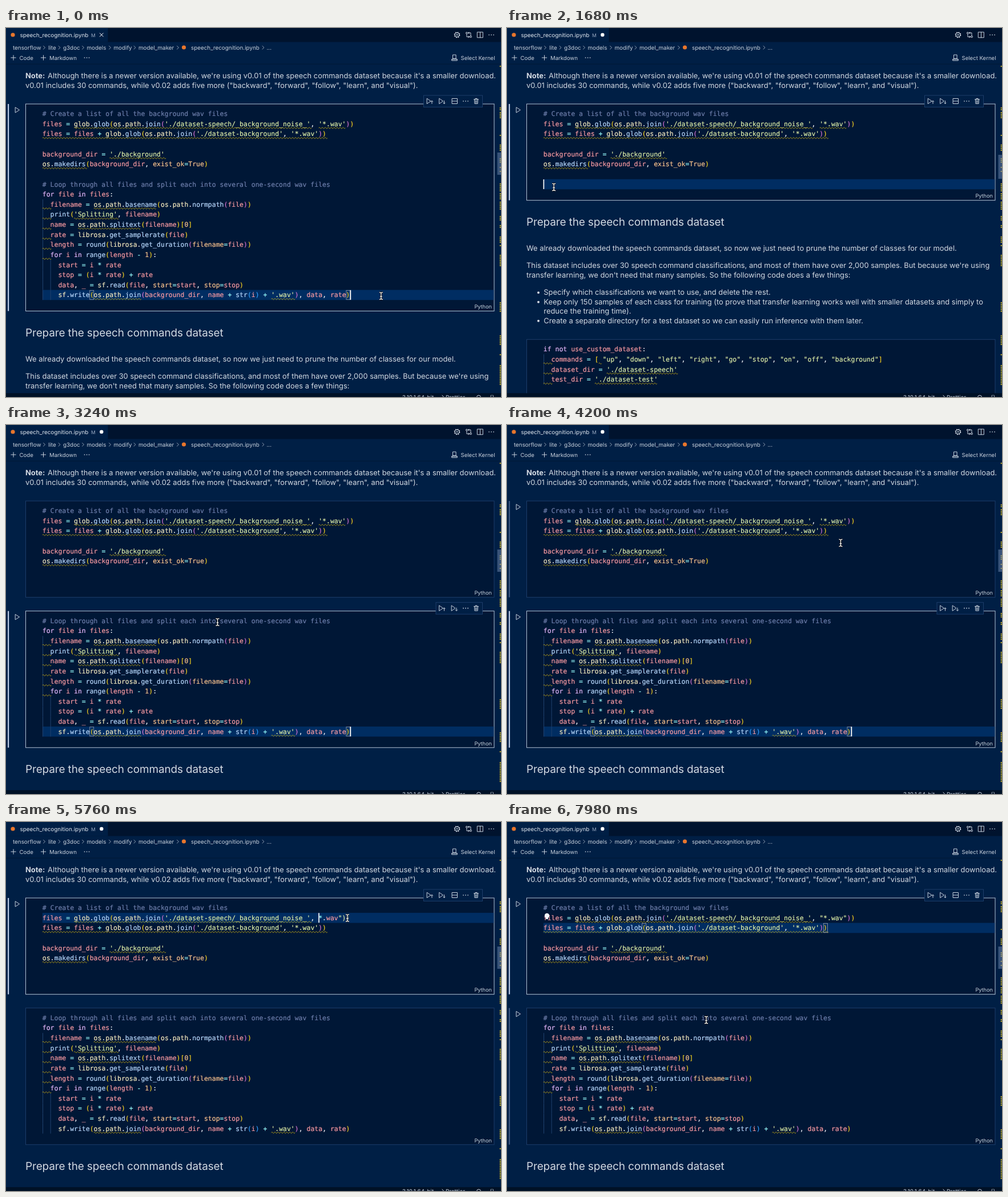
These frames come from a looping animation (867 by 646 pixels, 8 s). An HTML page:

```html
<!DOCTYPE html>
<html lang="en">
<head>
<meta charset="utf-8">
<title>Notebook editor</title>
<style>
html, body { margin: 0; width: 100%; height: 100%; overflow: hidden; background: #001f45; }
svg { display: block; width: 867px; height: 646px; }
text { white-space: pre; font-family: Inter, sans-serif; font-optical-sizing: none; text-rendering: geometricPrecision; }
.code { font-family: "DejaVu Sans Mono", monospace; font-size: 11.48px; stroke-width: .18; }
.body { font-size: 12.92px; fill: #d3d9e2; }
.ui { font-size: 9.85px; fill: #c8d0dc; }
.tool { font-size: 9.6px; }
.icon { fill: none; stroke: #c8d0dc; stroke-width: 1; stroke-linecap: round; stroke-linejoin: round; }
</style>
</head>
<body>
<svg viewBox="0 0 867 646">
  <rect width="867" height="646" fill="#001f45"/>
  <g id="doc"></g>
  <g id="chrome"></g>
  <rect id="caret" width="1.7" height="17" fill="#fff"/>
  <g id="mouse"></g>
</svg>
<script>
const LOOP = 8000, X0 = 63.8, CW = 6.911, LH = 17.62;
const PAGE = '#001f45', CELL = '#001736', EDGE = '#1d3d6a';
const el = id => document.getElementById(id);
const rect = (x, y, w, h, fill, more = '') =>
  `<rect x="${x}" y="${y}" width="${w}" height="${h}" fill="${fill}" ${more}/>`;
const text = (x, y, s, cls = 'ui', more = '') => `<text x="${x}" y="${y}" class="${cls}" ${more}>${s}</text>`;
const icon = (x, y, d, more = '') => `<path class="icon" transform="translate(${x} ${y})" d="${d}" ${more}/>`;

const PLUS = 'M-4.2 0H4.2M0-4.2V4.2', DOTS = 'M-4 0h.1M0 0h.1M4 0h.1', CHEVRON = 'M-1.5-2.8L1.5 0L-1.5 2.8';
const RUN = 'M-3-4.5L4 0L-3 4.5Z';
const RUN_UP = 'M-4.5-4.5L2 0L-4.5 4.5ZM4 4.5V-.5M2.3 1L4-.7L5.7 1';
const RUN_DOWN = 'M-4.5-4.5L2 0L-4.5 4.5ZM4-.5V4.5M2.3 3L4 4.7L5.7 3';
const SPLIT = 'M-4.5-4.5H4.5V4.5H-4.5ZM-4.5 0H4.5';
const TRASH = 'M-4-3H4M-1.5-3V-4.5H1.5V-3M-3-3L-2.6 4.5H2.6L3-3M-1-1V3M1-1V3';
const dots = (x, y) => icon(x, y, DOTS, 'style="stroke-width:1.7"');

// A tilde switches the warning underline on and off.
const HEAD = [
  '# Create a list of all the background wav files',
  '',
  "~files = files + glob.glob(os.path.join('./dataset-background', '*.wav'))~",
  '',
  "background_dir = ~'./background'~",
  '~os.makedirs~(background_dir, exist_ok=True)',
  ''
];
const TAIL = [
  '# Loop through all files and split each into several one-second wav files',
  'for file in files:',
  '~  ~filename = ~os.path.basename~(os.path.normpath(file))',
  "~  ~print(~'Splitting'~, filename)",
  '~  ~name = ~os.path.splitext~(filename)[0]',
  '~  ~rate = librosa.get_samplerate(file)',
  '~  ~length = round(librosa.get_duration(filename=file))',
  '~  ~for i in range(length - 1):',
  '    start = i * rate',
  '    stop = (i * rate) + rate',
  '    data, _ = sf.read(file, start=start, stop=stop)',
  "    sf.write(~os.path.join~(background_dir, name + str(i) + ~'.wav'~), data, rate)"
];
const NEXT = [
  'if not use_custom_dataset:',
  '~  ~commands = [~ ~"up", "down", "left", "right", "go", "stop", "on", "off", "background"]',
  "~  ~dataset_dir = ~'./dataset-speech'~",
  "~  ~test_dir = ~'./dataset-test'~",
  '', ''
];
const plain = s => s.replace(/~/g, '');

const TOKEN = /(#.*)|('[^']*'?|"[^"]*"?)|\b(for|in|if|not)\b|\b(True|\d+|[a-z_]+(?==))|([A-Za-z_]\w*)(?=\()|\b(glob|os|path|sf|librosa)\b|([A-Za-z_]\w*)|([=+*-])|([()[\]])|(.)/g;
const COLORS = ['#7080ae', '#e0efa8', '#ebbbff', '#ffc58f', '#bbdaff', '#f7ebc0', '#ff9da4', '#99ffff'];
const BRACKETS = ['#f5d020', '#d673d2', '#2f9fff'];

function paint(line) {
  let depth = 0;
  return line.replace(TOKEN, (tok, ...groups) => {
    const kind = groups.slice(0, 10).findIndex(g => g !== undefined);
    let color = COLORS[kind] || '#f0f3f8';
    if (kind === 8) color = BRACKETS['(['.includes(tok) ? depth++ % 3 : Math.max(0, --depth) % 3];
    return `<tspan fill="${color}" stroke="${color}">${tok}</tspan>`;
  });
}

function squiggles(line, y) {
  let col = 0, out = '';
  line.split('~').forEach((part, i) => {
    if (i % 2) {
      const x = X0 + col * CW, n = Math.max(1, Math.round(part.length * CW / 5.2));
      out += `<path d="M${x} ${y}${'q1.3-2.4 2.6 0t2.6 0'.repeat(n)}" fill="none" stroke="#c2a814" stroke-width=".9"/>`;
    }
    col += part.length;
  });
  return out;
}

const lineY = (top, i) => top + 17.2 + i * LH;
const cellHeight = n => n * LH + 27.7;

function bracketPair(line, col) {
  if (line[col - 1] !== ')') return [];
  for (let i = col - 1, depth = 0; i >= 0; i--) {
    depth += line[i] === ')' ? 1 : line[i] === '(' ? -1 : 0;
    if (!depth) return [i, col - 1];
  }
  return [];
}

function selection(top, lines, from) {
  let out = '';
  for (let i = from.line; i < lines.length; i++) {
    const s = plain(lines[i]), start = i === from.line ? from.col : 0;
    const w = (s.length - start) * CW + (i < lines.length - 1 ? 7 : 0);
    out += rect(X0 + start * CW, lineY(top, i) - 8.8, w, LH, '#003a82');
    const marks = s.replace(/./g, (c, k) => c === ' ' && k >= start ? '·' : ' ');
    out += text(X0, lineY(top, i) + 4, marks, 'code', 'fill="#4a74b4"');
  }
  return out;
}

function toolbar(top, split) {
  const x = split ? 731.5 : 753, y = top - 5;
  const xs = split ? [742, 763.5] : [763.5, 785];
  return rect(x, y - 10, 834.5 - x, 20.5, PAGE, `stroke="${EDGE}"`) +
    icon(xs[0], y, RUN_UP) + icon(xs[1], y, RUN_DOWN) +
    (split ? icon(786, y, SPLIT) : '') + dots(805, y) + icon(823.5, y, TRASH);
}

function cell(top, lines, { focus, hover, caret, select, split } = {}) {
  const h = cellHeight(lines.length);
  let out = rect(34.5, top, 820.5, h, CELL, `stroke="${focus ? '#b4c0d4' : EDGE}"`);
  if (focus || hover) {
    out += rect(3, top, 2.2, h, focus ? '#b9c8e4' : '#3d5881') + icon(19.5, top + 10.5, RUN);
  }
  if (select) out += selection(top, lines, select);
  else if (focus) out += rect(X0, lineY(top, caret.line) - 8.8, 790.5, LH, '#002d62');
  lines.forEach((line, i) => {
    const y = lineY(top, i), s = plain(line), indent = s.search(/\S/);
    if (indent >= 2) out += rect(64, y - 8.8, 1, LH, '#1f416e');
    if (indent >= 4) out += rect(77.6, y - 8.8, 1, LH, '#1f416e');
    out += text(X0, y + 4, paint(s), 'code') + squiggles(line, y + 7.2);
  });
  if (focus && !select) {
    for (const c of bracketPair(plain(lines[caret.line]), caret.col)) {
      out += rect(X0 + c * CW, lineY(top, caret.line) - 8, CW, 16, 'none', 'stroke="#8b95a5" stroke-width=".9"');
    }
  }
  out += text(851, top + h - 4.2, 'Python', 'ui', 'text-anchor="end" style="font-size:9.2px"');
  return out + (focus ? toolbar(top, split) : '');
}

function prose(y) {
  const row = (dy, s, x = 34) => text(x, y + dy, s, 'body');
  const bullet = dy => `<circle cx="55" cy="${y + dy - 4}" r="2" fill="#d3d9e2"/>`;
  return text(34, y + 44.6, 'Prepare the speech commands dataset', 'body', 'style="font-size:18.95px;letter-spacing:-.12px"') +
    row(88.6, 'We already downloaded the speech commands dataset, so now we just need to prune the number of classes for our model.') +
    row(118.8, "This dataset includes over 30 speech command classifications, and most of them have over 2,000 samples. But because we're using") +
    row(135.2, "transfer learning, we don't need that many samples. So the following code does a few things:") +
    bullet(165.7) + row(165.7, 'Specify which classifications we want to use, and delete the rest.', 64.3) +
    bullet(182.2) + row(182.2, 'Keep only 150 samples of each class for training (to prove that transfer learning works well with smaller datasets and simply to', 64.3) +
    row(198.6, 'reduce the training time).', 64.3) +
    bullet(215) + row(215, 'Create a separate directory for a test dataset so we can easily run inference with them later.', 64.3) +
    cell(y + 243.6, NEXT);
}

function insertButtons(y) {
  const box = (x, w, fill, s) => rect(x, y - 3.5, w, 17.5, fill, `stroke="${EDGE}"`) +
    icon(x + 8.5, y + 5.3, PLUS) + text(x + 18, y + 9, s, 'ui tool');
  return box(372, 45, '#1c3152', 'Code') + box(429, 66.5, PAGE, 'Markdown');
}

// Timeline
const PRESS = 250, CUT = 1520, INSERT = 2640, PASTE = 2920, FOCUS = 4500, NEXT_LINE = 7300;
const BLINKS = [0, 250, 600, 1000, CUT, INSERT, PASTE, FOCUS, 5150, 5600, 6100, NEXT_LINE];
const PATH = [
  [0, 657, 469], [230, 606, 468], [300, 604, 467], [900, 33.5, 273], [1500, 33.5, 273],
  [2300, 406, 315], [2700, 406, 315], [3180, 370.5, 345], [3750, 370.5, 345], [4420, 656, 160],
  [4930, 656, 160], [5130, 598, 168], [5950, 598, 168], [6080, 621, 165], [6800, 621, 165],
  [7220, 580, 186], [7450, 580, 186], [7950, 349, 346.5]
];

function mouseAt(t) {
  const i = PATH.findIndex(p => p[0] > t);
  if (i < 0) return PATH[PATH.length - 1].slice(1);
  const [t0, x0, y0] = PATH[i - 1], [t1, x1, y1] = PATH[i];
  const k = (t - t0) / (t1 - t0), e = k * k * (3 - 2 * k);
  return [x0 + (x1 - x0) * e, y0 + (y1 - y0) * e];
}

function globLine(t) {
  const open = t < 5720 ? "'" : t < 5850 ? '' : '"';
  const close = t < 5300 ? "'" : t < 5430 ? '' : '"';
  const mark = t < 5300 ? '~' : '';
  return `files = ~glob.glob(os.path.join('./dataset-speech/_background_noise_'~, ${mark}${open}*.wav${close}${mark}))`;
}

function caretAt(t, lines) {
  if (t < PRESS) return { cell: 0, line: 18, col: 78 };
  if (t < CUT) {
    const [x, y] = mouseAt(t);
    const line = Math.min(18, Math.max(7, Math.round((y - 150.2) / LH)));
    const col = Math.min(plain(lines[line]).length, Math.max(0, Math.round((x - X0) / CW)));
    return { cell: 0, line, col };
  }
  if (t < INSERT) return { cell: 0, line: 7, col: 0 };
  if (t < PASTE) return { cell: 1, line: 0, col: 0 };
  if (t < FOCUS) return { cell: 1, line: 11, col: 78 };
  if (t >= NEXT_LINE) return { cell: 0, line: 2, col: 72 };
  const col = t < 5150 ? 79 : t < 5300 ? 77 : t < 5430 ? 76 : t < 5600 ? 77 :
    t < 5720 ? 71 : t < 5850 ? 70 : t < 6100 ? 71 : 79;
  return { cell: 0, line: 1, col };
}

function notebook(t) {
  const first = [...HEAD, ...(t < CUT ? TAIL : [''])];
  first[1] = globLine(t);
  const caret = caretAt(t, first);
  const top2 = 133 + cellHeight(8) + 24;
  const select = t >= PRESS && t < CUT && caret.col + caret.line < 96 ? caret : null;
  let bottom = 133 + cellHeight(first.length);
  let out = text(34, 88, 'Note:', 'body', 'font-weight="700"') +
    text(73, 88, "Although there is a newer version available, we're using v0.01 of the speech commands dataset because it's a smaller download.", 'body') +
    text(34, 104.5, 'v0.01 includes 30 commands, while v0.02 adds five more ("backward", "forward", "follow", "learn", and "visual").', 'body') +
    cell(133, first, { focus: caret.cell === 0, hover: t > 4100, caret, select, split: true });
  if (t >= INSERT) {
    const lines = t < PASTE ? [''] : TAIL;
    out += cell(top2, lines, { focus: caret.cell === 1, hover: t > 7720, caret });
    bottom = top2 + cellHeight(lines.length);
  }
  out += prose(bottom);
  if (t >= 2150 && t < INSERT) out += insertButtons(bottom);
  if (t >= 7540) out += '<circle cx="70" cy="164" r="4.2" fill="#f4f6fa"/>' + rect(68, 167, 4, 3, '#f4f6fa');
  return { out, caret, caretY: lineY(caret.cell ? top2 : 133, caret.line) - 8.5 };
}

function chrome(t) {
  const dirty = t >= CUT;
  const logo = (x, y) => `<circle cx="${x}" cy="${y}" r="3.6" fill="#e8762c"/>`;
  const crumbs = [['tensorflow', 12, 67], ['lite', 74, 93.5], ['g3doc', 100, 135], ['models', 141.5, 182],
    ['modify', 188.5, 225.5], ['model_maker', 232, 301], ['speech_recognition.ipynb', 324, 450.5]];
  const marks = [[66, 2], [139, 6], [147, 11], [187, 2], [204, 11], [228, 8], [243, 2], [250, 2], [272, 14],
    [289, 12], [304, 13], [329, 7], [345, 6], [365, 10], [380, 3], [397, 20], [480, 17], [538, 18], [571, 2], [590, 36]];
  let out = rect(0, 0, 867, 24.5, '#00132e') + rect(0, 0, 178.5, 24.5, PAGE) + logo(12, 12) +
    text(24.5, 15.8, 'speech_recognition.ipynb', 'ui', 'style="fill:#e3e8f0"') +
    text(149, 15.5, 'M', 'ui', 'style="font-size:8.6px;fill:#9aa9c2"') +
    (dirty ? '<circle cx="167.3" cy="12" r="3.2" fill="#fff"/>' : icon(167.3, 12, 'M-3-3L3 3M3-3L-3 3', 'style="stroke:#fff"'));
  out += '<circle cx="790" cy="12" r="4.5" fill="none" stroke="#c8d0dc" stroke-width="1.8" stroke-dasharray="1.9 1.634"/>' +
    '<circle cx="790" cy="12" r="3.7" fill="none" stroke="#c8d0dc"/><circle cx="790" cy="12" r="1.2" fill="#c8d0dc"/>' +
    icon(810.5, 12, 'M-3.5-1.5V3.5H1M-.5 2L1 3.5L-.5 5M3.5 1.5V-3.5H-1M.5-5L-1-3.5L.5-2M-5-3.2a1.5 1.5 0 1 0 3 0a1.5 1.5 0 1 0-3 0M2 3.2a1.5 1.5 0 1 0 3 0a1.5 1.5 0 1 0-3 0') +
    icon(830.5, 12, 'M-4.8-4.8H4.8V4.8H-4.8ZM0-4.8V4.8') + dots(850, 12);
  for (const [s, x, sep] of crumbs) out += text(x, 37.6, s) + icon(sep, 34.3, CHEVRON, 'opacity=".7"');
  out += logo(311.5, 34) + text(456.5, 37.6, '...');
  out += icon(13, 52, PLUS) + text(23.5, 55.6, 'Code', 'ui tool') + icon(65.5, 52, PLUS) +
    text(76, 55.6, 'Markdown', 'ui tool') + dots(141.5, 52) +
    icon(785.5, 52, 'M-2.6-5H2.6V1.5H-2.6ZM-2.6 1.5L-4.8 3V5H4.8V3L2.6 1.5M-4.8 3H4.8') +
    text(796.5, 55.6, 'Select Kernel', 'ui tool') + rect(0, 62.6, 867, 1, '#001836');
  const slide = t >= CUT && t < INSERT ? [222, 42] : [218, 39];
  for (const [y, h] of marks) {
    for (let k = 0; k < h; k += 3) out += rect(864.6, y + k, 2.4, 2, '#a99a2c');
  }
  out += rect(860.5, slide[0], 6.5, slide[1], '#7288ad', 'opacity=".5"');
  out += rect(0, 639.3, 867, 7, '#001126') +
    text(694, 650, '3.10.1 64-bit') + icon(766, 646, 'M-2-3L4 4') + text(770, 650, 'Prettier') +
    icon(828, 646.5, 'M-3.5 2V0a3.5 3.5 0 0 1 7 0V2') + text(847, 650, '{}');
  return out;
}

const BEAM = 'M-3-6.2Q0-6.2 0-4.2V4.2Q0 6.2-3 6.2M3-6.2Q0-6.2 0-4.2V4.2Q0 6.2 3 6.2M-1.8 1.2H1.8';
const HAND = 'M-2.5-5.5C-2.5-7.2-.3-7.2-.3-5.5V-1.2L.4-1.9Q1.6-2.4 2.1-1.2Q3.3-1.6 3.7-.5Q5.3-.6 5.3 1V3.2Q5.2 5.4 3.8 7H-1.5Q-2.4 5.2-4.6 2.6Q-4.8.9-2.5 2Z';

function pointer(kind) {
  if (kind === 'hand') return `<path d="${HAND}" fill="#fff" stroke="#111" stroke-width="1"/>`;
  const ring = kind === 'press' ? '<circle r="12.8" fill="#10203a" fill-opacity=".55" stroke="#9aa3b0" stroke-width="1.2"/>' : '';
  return ring + `<path d="${BEAM}" fill="none" stroke="#111" stroke-width="3"/><path d="${BEAM}" fill="none" stroke="#fff" stroke-width="1.2"/>`;
}

function put(node, html) {
  if (node.last !== html) node.innerHTML = node.last = html;
}

function render(t) {
  const { out, caret, caretY } = notebook(t);
  put(el('doc'), out);
  put(el('chrome'), chrome(t));
  const since = t - BLINKS.filter(b => b <= t).pop();
  const bar = el('caret');
  bar.setAttribute('x', X0 + caret.col * CW - .3);
  bar.setAttribute('y', caretY);
  bar.setAttribute('opacity', since % 1000 < 500 ? 1 : 0);
  const [x, y] = mouseAt(t);
  const kind = t >= PRESS && t < 1260 ? 'press' : t > 2180 && t < 2800 ? 'hand' : 'beam';
  el('mouse').setAttribute('transform', `translate(${x.toFixed(2)} ${y.toFixed(2)})`);
  put(el('mouse'), pointer(kind));
}

const begin = performance.now();
function tick() {
  render((performance.now() - begin) % LOOP);
  requestAnimationFrame(tick);
}
tick();
</script>
</body>
</html>
```
